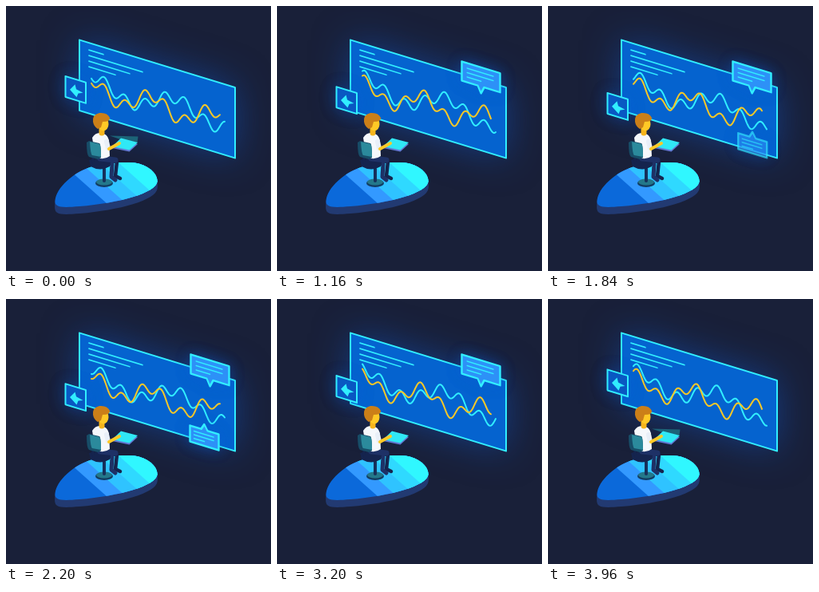
Animation of 332 by 332 pixels, one loop 4 s. Source, as an HTML page with a canvas:

```html
<!DOCTYPE html>
<html lang="en">
<head>
<meta charset="utf-8">
<title>Dashboard</title>
<style>
html, body { margin: 0; width: 100%; height: 100%; overflow: hidden; background: #192039; }
canvas { display: block; width: 332px; height: 332px; }
</style>
</head>
<body>
<canvas id="stage"></canvas>
<script>
const LOOP = 4000, WAVE = 2600, SIZE = 332, SLOPE = 0.305, TAU = Math.PI * 2;
const CYAN = '#31eeff', YELLOW = '#f9c926', PANEL = '#0563cf';
const canvas = document.getElementById('stage');
const ctx = canvas.getContext('2d');
const dpr = window.devicePixelRatio || 1;
canvas.width = canvas.height = SIZE * dpr;
ctx.scale(dpr, dpr);
ctx.lineJoin = ctx.lineCap = 'round';

const ramp = (t, a, b) => Math.max(0, Math.min(1, (t - a) / (b - a)));

function paint(fill, stroke, width) {
  if (fill) { ctx.fillStyle = fill; ctx.fill(); }
  if (stroke) { ctx.strokeStyle = stroke; ctx.lineWidth = width; ctx.stroke(); }
}

function poly(points, fill, stroke, width = 2) {
  ctx.beginPath();
  points.forEach(([x, y]) => ctx.lineTo(x, y));
  ctx.closePath();
  paint(fill, stroke, width);
}

function stroke(points, color, width) {
  ctx.beginPath();
  points.forEach(([x, y]) => ctx.lineTo(x, y));
  paint(null, color, width);
}

function shape(d, fill) {
  ctx.fillStyle = fill;
  ctx.fill(new Path2D(d));
}

function ellipse(x, y, rx, ry, fill) {
  ctx.beginPath();
  ctx.ellipse(x, y, rx, ry, 0, 0, TAU);
  paint(fill);
}

// Draws on the slanted wall, with the origin at x, y.
function onWall(x, y, alpha, draw) {
  if (alpha <= 0) return;
  ctx.save();
  ctx.globalAlpha = alpha;
  ctx.transform(1, SLOPE, 0, 1, x, y);
  draw();
  ctx.restore();
}

function glow(opacity, blur, draw) {
  ctx.save();
  ctx.shadowColor = `rgba(16,90,210,${opacity})`;
  ctx.shadowBlur = blur * dpr;
  draw();
  ctx.restore();
}

const rect = (w, h) => [[0, 0], [w, 0], [w, h], [0, h]];

// A long swell with a short ripple that travels right on top of it.
function wave(t, end, base, slope, swell, color) {
  const start = 107, points = [];
  for (let x = start; x <= end; x++) {
    const d = x - start;
    const ripple = Math.cos(TAU * ((x - 123.5) / 25 - t / WAVE));
    points.push([x, base + slope * d - 11 * Math.cos(TAU * d / swell) - 7 * ripple]);
  }
  stroke(points, color, 2);
}

function drawPanel(t) {
  onWall(92, 42.5, 1, () => {
    glow(0.5, 46, () => poly(rect(195, 88.5), PANEL));
    poly(rect(195, 88.5), PANEL, CYAN);
    [18, 67, 51, 33].forEach((w, i) => {
      const y = 9 + 7 * i;
      stroke([[12, y], [12 + w, y]], CYAN, 1.6);
    });
  });
  wave(t, 274, 98, 0.27, 104, CYAN);
  wave(t, 268, 104, 0.25, 75, YELLOW);
}

function drawBadge(t) {
  const shift = Math.min(t / 1880, (LOOP - t) / (LOOP - 1880));
  onWall(74.5, 88 + 21.5 * shift, 1, () => {
    glow(0.4, 20, () => poly(rect(25.5, 26), '#0a58c2', CYAN));
    poly([[5.5, 15], [12, 6.5], [13.5, 12], [22, 14], [16, 16.5], [14, 22]], CYAN);
  });
}

// A positive tail hangs below the bubble, a negative one points up.
function drawBubble(x, y, w, h, tail, alpha) {
  const mid = w / 2, edge = tail > 0 ? h : 0, far = h - edge;
  onWall(x, y, alpha, () => {
    glow(0.45, 18, () => poly([[0, far], [w, far], [w, edge], [mid + 4, edge],
      [mid, edge + tail], [mid - 4, edge], [0, edge]], '#3095fa', CYAN, 2.4));
    [0.68, 0.68, 0.36].forEach((part, i) => {
      const ly = h * (0.27 + 0.23 * i);
      stroke([[w * 0.14, ly], [w * (0.14 + part), ly]], CYAN, 1.5);
    });
  });
}

function drawBubbles(t) {
  const up = ramp(t, 300, 1000);
  drawBubble(231.5, 69.5 + 38 * (1 - up), 48, 24, 8.5, up * (1 - ramp(t, 3400, 3800)));
  const left = ramp(t, 1400, 2120);
  drawBubble(230.5 + 20 * (1 - left), 158.5 + 2 * (1 - left), 36, 20, -7,
    left * (1 - ramp(t, 2280, 2860)));
}

function drawPlatform() {
  const top = 'M61.5 244C63 228 84 207 112 200C134 196 152 195 164 197C181 201 190 211 189.5 220' +
    'C188 234 142 247 92 251C68 253 61 252 61.5 244Z';
  ctx.save();
  for (let i = 0; i < 9; i++) {
    ctx.translate(0, 1);
    shape(top, '#223a72');
  }
  ctx.restore();
  ctx.save();
  ctx.clip(new Path2D(top));
  ['#0b69da', '#3399ff', '#2fc3ff', '#2fd9ff', '#30f7ff'].forEach((color, i) => {
    const x = i ? 50 + 24 * i : -60;
    poly([[x - 12, 190], [x + 62, 256], [260, 256], [260, 190]], color);
  });
  ctx.restore();
}

function drawLaptop(t) {
  const lid = Math.max(1 - ramp(t, 250, 520), ramp(t, 3600, 3880));
  ctx.save();
  ctx.globalAlpha = lid;
  poly([[130, 162.5], [165.5, 163.5], [164.5, 171], [143, 167]], '#1c6378');
  ctx.restore();
  const base = [[133, 176], [144, 165.5], [165, 171], [154.5, 180.5]];
  poly(base.map(([x, y]) => [x, y + 2]), '#6178d2');
  poly(base, '#30e8f5');
}

function drawPerson(t) {
  const navy = '#1e3166', dark = '#15244e', skin = '#ffc926';
  // stool and legs
  ellipse(123, 222, 11, 5, '#123d62');
  ellipse(123, 220.5, 10, 4, '#23788a');
  stroke([[123, 204], [123, 219]], '#16305b', 4);
  stroke([[122, 193], [139, 195], [137, 213], [143, 216]], dark, 4.5);
  stroke([[120, 195], [133, 198], [132, 214], [137, 218]], navy, 5);
  shape('M104 193Q117 189 131 196L130 201Q118 208 106 201Z', dark);
  stroke([[118, 191], [137, 193]], navy, 7);
  // body and head
  shape('M108 165Q112 158 119 159Q127 160 129 168L130 188Q122 194 112 189Z', '#f5f8fc');
  stroke([[120, 152], [120, 159]], '#f6b51c', 7);
  ellipse(122, 148, 6.5, 8.5, skin);
  shape('M109 145Q108 136 117 134Q127 133 130 140Q131 145 121 145L119 152L115 154Q110 151 109 145Z', '#cb7f18');
  // chair back
  stroke([[108, 188], [110, 198]], dark, 3);
  shape('M101 171L104 169L117 172Q119 173 119 190L115 192L104 189Q101 187 101 171Z', '#174d68');
  shape('M105 170L117 173Q119 174 119 189L108 187Q106 186 105 170Z', '#2b8a9c');
  drawLaptop(t);
  stroke([[126, 170], [128, 178]], '#e9eff8', 6);
  stroke([[129, 179], [142, 172]], skin, 4);
}

const start = performance.now();

function frame() {
  const t = (performance.now() - start) % LOOP;
  ctx.fillStyle = '#192039';
  ctx.fillRect(0, 0, SIZE, SIZE);
  drawPanel(t);
  drawBadge(t);
  drawBubbles(t);
  drawPlatform();
  drawPerson(t);
  requestAnimationFrame(frame);
}

frame();
</script>
</body>
</html>
```
